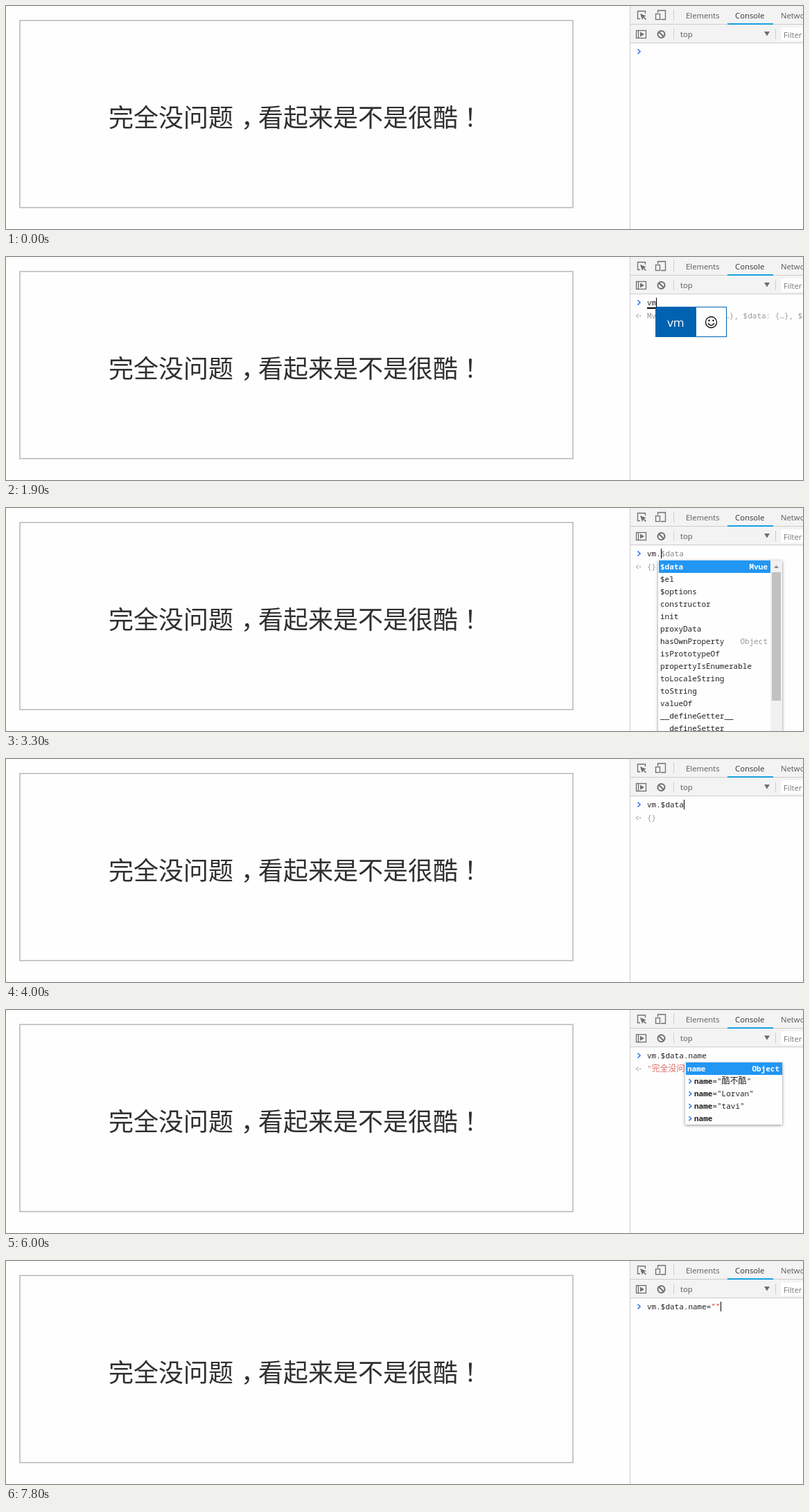
Recreate the animation shown at these times as an HTML page. Size 1150 px wide and 323 px high, loop 8 s.

```html
<!DOCTYPE html>
<html lang="zh-CN">
<head>
<meta charset="utf-8">
<style>
  html, body { margin: 0; height: 100%; overflow: hidden; background: #fefefe; }
  svg { display: block; }
  text { white-space: pre; }
  .title { font: 36px "Noto Sans CJK SC", "Noto Sans CJK", sans-serif; fill: #2f2f2f; }
  .ui { font: 11.3px "Open Sans", sans-serif; fill: #5a5a5a; }
  .code { font: 11px "Noto Sans Mono", "Noto Sans CJK SC", "Noto Sans CJK", monospace; fill: #222; }
  .cjk { font-size: 12px; }
  .b { font-weight: 700; }
  .icon { fill: none; stroke: #6e6e6e; stroke-width: 1.3; }
  .solid { fill: #6e6e6e; }
  .line { fill: #ccc; }
  .menu { filter: drop-shadow(0 1px 2px rgba(0, 0, 0, .45)); }
</style>
</head>
<body>
<svg width="1150" height="323" viewBox="0 0 1150 323">
  <rect x="20" y="21" width="798" height="271" fill="none" stroke="#c8c8c8" stroke-width="2"/>
  <text class="title" x="148" y="175">完全没问题</text>
  <text class="title" x="339" y="175">，</text>
  <text class="title" x="364" y="175">看起来是不是很酷</text>
  <text class="title" x="652" y="175" lang="ja" style="font-family:'Noto Sans CJK JP','Noto Sans CJK',sans-serif">！</text>

  <rect x="900" width="250" height="54" fill="#f3f3f3"/>
  <g class="line">
    <rect x="900" width="1" height="323"/>
    <rect x="901" y="26" width="249" height="1"/>
    <rect x="901" y="53" width="249" height="1"/>
    <rect x="963" y="5" width="1" height="16"/>
    <rect x="963" y="33" width="1" height="15"/>
    <rect x="1110" y="33" width="1" height="15"/>
  </g>
  <rect x="1041" y="25" width="66" height="2" fill="#1a9fe0"/>
  <rect x="1118" y="31" width="32" height="19" fill="#fff"/>

  <g class="icon">
    <path d="M915 18.5H911.5V7.5H922.5V11"/>
    <path d="M940.500 10V6.500H951.500V19.500H945"/>
    <rect x="937.500" y="11.500" width="6" height="8"/>
    <rect x="909.500" y="35.500" width="14" height="11"/>
    <path d="M912.500 35.500V46.500"/>
    <g stroke-width="2"><circle cx="945.500" cy="41" r="5"/><path d="M942 37.500L949 44.500"/></g>
  </g>
  <g class="solid">
    <path d="M915 11L924 14.500L920.500 15.500L924 19L922.500 20L919.500 16.800L918 20Z"/>
    <path d="M915 37.500L921 41L915 44.500Z"/>
    <path d="M1094 37H1102L1098 43.500Z"/>
  </g>
  <g class="ui">
    <text x="981" y="18">Elements</text>
    <text x="1052" y="18" fill="#333" style="fill:#333">Console</text>
    <text x="1118" y="18">Network</text>
    <text x="973" y="45">top</text>
    <text x="1122" y="46" style="fill:#777">Filter</text>
  </g>
  <path d="M911.500 62.500L915 66L911.500 69.500" fill="none" stroke="#367cf1" stroke-width="1.700"/>
  <g id="live"></g>
</svg>
<script>
const LOOP = 8000, LEFT = 925, CHAR = 6.6, ROW = 18, TOP = 76;
const RED = '#c41a16', GREY = '#888', BLUE = '#2196f3';

const accessors = ['__defineGetter__', '__defineSetter__', '__lookupGetter__', '__lookupSetter__', '__proto__'];
const inherited = ['hasOwnProperty', 'isPrototypeOf', 'propertyIsEnumerable', 'toLocaleString', 'toString', 'valueOf', ...accessors];
const values = ['"酷不酷"', '"Lorvan"', '"tavi"'];
const past = [...values.map(v => '>name=' + v), '>name'];

// right: edge of the rows, q: length of the matched prefix
const members = {
  x: 942, right: 1103, bar: true, sel: true, labels: { 0: 'Mvue', 6: 'Object' },
  rows: ['$data', '$el', '$options', 'constructor', 'init', 'proxyData', ...inherited]
};
const hidden = { x: 942, right: 1134, sel: true, q: 1, labels: { 0: 'Object' }, rows: accessors };
const fields = {
  x: 981, right: 1156, sel: true, labels: { 0: 'Object' },
  rows: ['name', 'constructor', ...inherited, ...past]
};
const named = q => ({ x: 981, right: 1120, sel: true, q, labels: { 0: 'Object' }, rows: ['name', ...past] });
const assigned = q => ({ x: 1014, right: 1120, q, labels: {}, rows: values.map(v => '>' + v) });

const steps = [
  [0, { text: '', ghost: '', ime: '', result: '', menu: null, on: 0, back: 0 }],
  [800, { on: 1 }],
  [1200, { on: 0 }],
  [1700, { text: 'v', ime: 'v', on: 1 }],
  [1800, { text: 'vm', ime: 'vm' }],
  [1900, { result: 'Mvue {$options: {…}, $data: {…}, $el: div#app}' }],
  [2100, { ime: '' }],
  [2300, { on: 0 }],
  [2500, { text: 'vm.', ghost: '$data', result: '', menu: members, on: 1 }],
  [2600, { result: '{}' }],
  [2800, { text: 'vm._', ghost: '_defineGetter__', menu: hidden }],
  [3300, { text: 'vm.', ghost: '$data', menu: members }],
  [3800, { on: 0 }],
  [4000, { text: 'vm.$data', ghost: '', menu: null, on: 1 }],
  [4500, { on: 0 }],
  [5000, { text: 'vm.$data.', ghost: 'name', result: '', menu: fields, on: 1 }],
  [5100, { result: '"完全没问题，看起来是不是很酷！"' }],
  [5300, { text: 'vm.$data.n', ghost: 'ame', menu: named(1) }],
  [5400, { text: 'vm.$data.na', ghost: 'me', menu: named(2) }],
  [5500, { text: 'vm.$data.name', ghost: '', menu: named(4) }],
  [6000, { on: 0 }],
  [6300, { text: 'vm.$data.name=', result: '', menu: assigned(0), on: 1 }],
  [6700, { text: 'vm.$data.name=""', menu: assigned(1), back: 1 }],
  [6900, { menu: null, back: 0 }],
  [7300, { on: 0 }],
  [7800, { on: 1 }]
];
let last = {};
const states = steps.map(([at, change]) => last = { ...last, ...change, at });

const rect = (x, y, w, h, fill, more = '') =>
  `<rect x="${x}" y="${y}" width="${w}" height="${h}" fill="${fill}" ${more}/>`;
const cjk = s => s.replace(/[\u3000-\u9fff\uff00-\uffef]+/g, '<tspan class="cjk">$&</tspan>');
const code = (x, y, body, fill = '#222', more = '') =>
  `<text class="code" x="${x}" y="${y}" style="fill:${fill}" ${more}>${body}</text>`;

function drawMenu({ x, right, rows, labels, sel, bar, q = 0 }) {
  const edge = bar ? right + 17 : right, h = rows.length * ROW;
  let out = rect(x - 1, TOP, edge - x + 1, h, '#fefefe', 'class="menu"');
  rows.forEach((row, i) => {
    const y = TOP + i * ROW, active = sel && !i, old = row[0] === '>';
    const word = old ? row.slice(1) : row;
    if (active) out += rect(x, y, right - x, ROW, BLUE);
    if (old) out += `<path d="M${x + 4.5} ${y + 6}l3.200 3.200l-3.200 3.200" fill="none" stroke="#367cf1" stroke-width="1.600"/>`;
    const body = active ? `<tspan class="b">${word}</tspan>`
      : (q ? `<tspan class="b">${word.slice(0, q)}</tspan>` : '') + cjk(word.slice(q));
    out += code(x + (old ? 12 : 2), y + 13, body, active ? '#fff' : '#222');
    if (labels[i]) {
      out += code(right - 4, y + 13, labels[i], active ? '#fff' : '#999',
        `text-anchor="end" font-weight="700"${active ? '' : ' style="font-weight:400"'}`)
        .replace('class="code"', active ? 'class="code b"' : 'class="code"');
    }
  });
  if (bar) {
    out += rect(right, TOP, 17, h, '#f1f1f1') + rect(right + 2, 93, 13, 186, '#c1c1c1')
      + `<path d="M${right + 5} 87h7l-3.500 -4z" fill="#8a8a8a"/>`;
  }
  return out;
}

function drawIme(word) {
  const x = LEFT + Math.round(word.length * CHAR) - 1, w = 27 + 16 * word.length, mid = x + w + 21.5;
  return rect(LEFT, 73, word.length * CHAR, 2, '#000')
    + rect(x + .5, 72.5, w + 43, 43, '#fff', 'stroke="#0063b1"')
    + rect(x, 72, w, 44, '#0063b1')
    + `<text x="${x + w / 2}" y="101" text-anchor="middle" style="font:17px 'Open Sans',sans-serif;fill:#fff">${word}</text>`
    + `<g fill="none" stroke="#000" stroke-width="1.300"><circle cx="${mid}" cy="94.500" r="8"/>`
    + `<path d="M${mid - 4.5} 96q4.500 6 9 0"/></g>`
    + `<circle cx="${mid - 3}" cy="92" r="1.200"/><circle cx="${mid + 3}" cy="92" r="1.200"/>`;
}

function draw(s) {
  let out = '';
  if (s.result) {
    out += '<path d="M912.500 82.500l-3 2.700l3 2.700" fill="none" stroke="#b5b5b5" stroke-width="1.300"/>'
      + rect(914, 84.3, 2, 2, '#b5b5b5')
      + code(LEFT, 89, cjk(s.result), s.result[0] === '"' ? '#dc6a66' : '#999');
  }
  const typed = s.text.replace(/".*"/, `<tspan style="fill:${RED}">$&</tspan>`);
  out += code(LEFT, 70, `${typed}<tspan style="fill:${GREY}">${s.ghost}</tspan>`);
  if (s.menu) out += drawMenu(s.menu);
  if (s.ime) out += drawIme(s.ime);
  if (s.on) out += rect(Math.round(LEFT + (s.text.length - s.back) * CHAR), 59, 1, 14, '#000');
  return out;
}

const live = document.getElementById('live');
let shown;
function tick() {
  const t = performance.now() % LOOP;
  const state = states.findLast(s => s.at <= t);
  if (state !== shown) live.innerHTML = draw(shown = state);
  requestAnimationFrame(tick);
}
tick();
</script>
</body>
</html>
```
